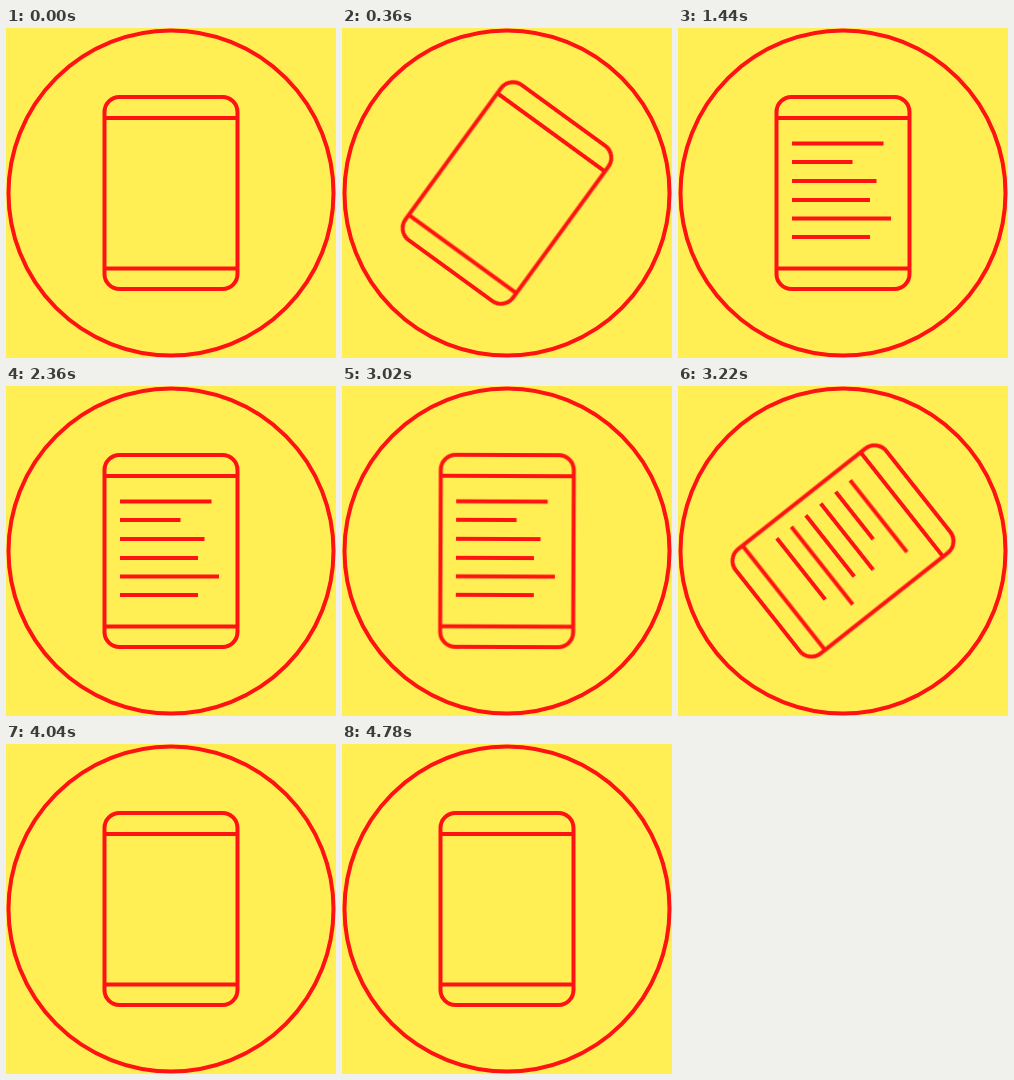
Animation of 330x330 px, one loop 4.8 s. Source, as an HTML page without scripts:

```html
<!DOCTYPE html>
<html lang="en">
<head>
<meta charset="utf-8">
<title>Spinning tablet</title>
<style>
  html, body {
    margin: 0;
    width: 100%;
    height: 100%;
    overflow: hidden;
    background: #ffef55;
  }
  svg {
    display: block;
    width: 100%;
    height: 100%;
    fill: none;
    stroke: #ff1212;
    stroke-width: 4;
  }
  .tablet {
    transform-origin: 165px 165px;
    animation: spin 4800ms infinite;
  }
  .text {
    animation: show 4800ms step-end infinite;
  }

  /* Two full turns, each swinging slightly past upright before settling. */
  @keyframes spin {
    0%, 3.333% { transform: rotate(0deg); animation-timing-function: cubic-bezier(.6, 0, .8, .5); }
    7.5% { transform: rotate(35.6deg); animation-timing-function: cubic-bezier(.4, .16, .5, 1); }
    13.75% { transform: rotate(368deg); animation-timing-function: ease-in-out; }
    15% { transform: rotate(362.6deg); animation-timing-function: ease-out; }
    16.667% { transform: rotate(360deg); animation-timing-function: linear; }
    62.5% { transform: rotate(360deg); animation-timing-function: cubic-bezier(.6, 0, .8, .5); }
    67.083% { transform: rotate(411.2deg); animation-timing-function: cubic-bezier(.4, .16, .5, 1); }
    72.917% { transform: rotate(729deg); animation-timing-function: ease-in-out; }
    74.167% { transform: rotate(727deg); animation-timing-function: ease-in-out; }
    76.667%, 100% { transform: rotate(720deg); }
  }

  /* The page fills and empties in the middle of each turn. */
  @keyframes show {
    0% { visibility: hidden; }
    10.417% { visibility: visible; }
    70% { visibility: hidden; }
    100% { visibility: hidden; }
  }
</style>
</head>
<body>
<svg viewBox="0 0 330 330">
  <circle cx="165" cy="165" r="162.5"/>
  <g class="tablet">
    <rect x="98.5" y="69" width="133" height="192" rx="15"/>
    <path d="M98.5 90h133M98.5 240.5h133"/>
    <path class="text" d="M114 115.5h91.5M114 134h60.5M114 153h84.5M114 172h78M114 190.5h99M114 209h78"/>
  </g>
</svg>
</body>
</html>
```
